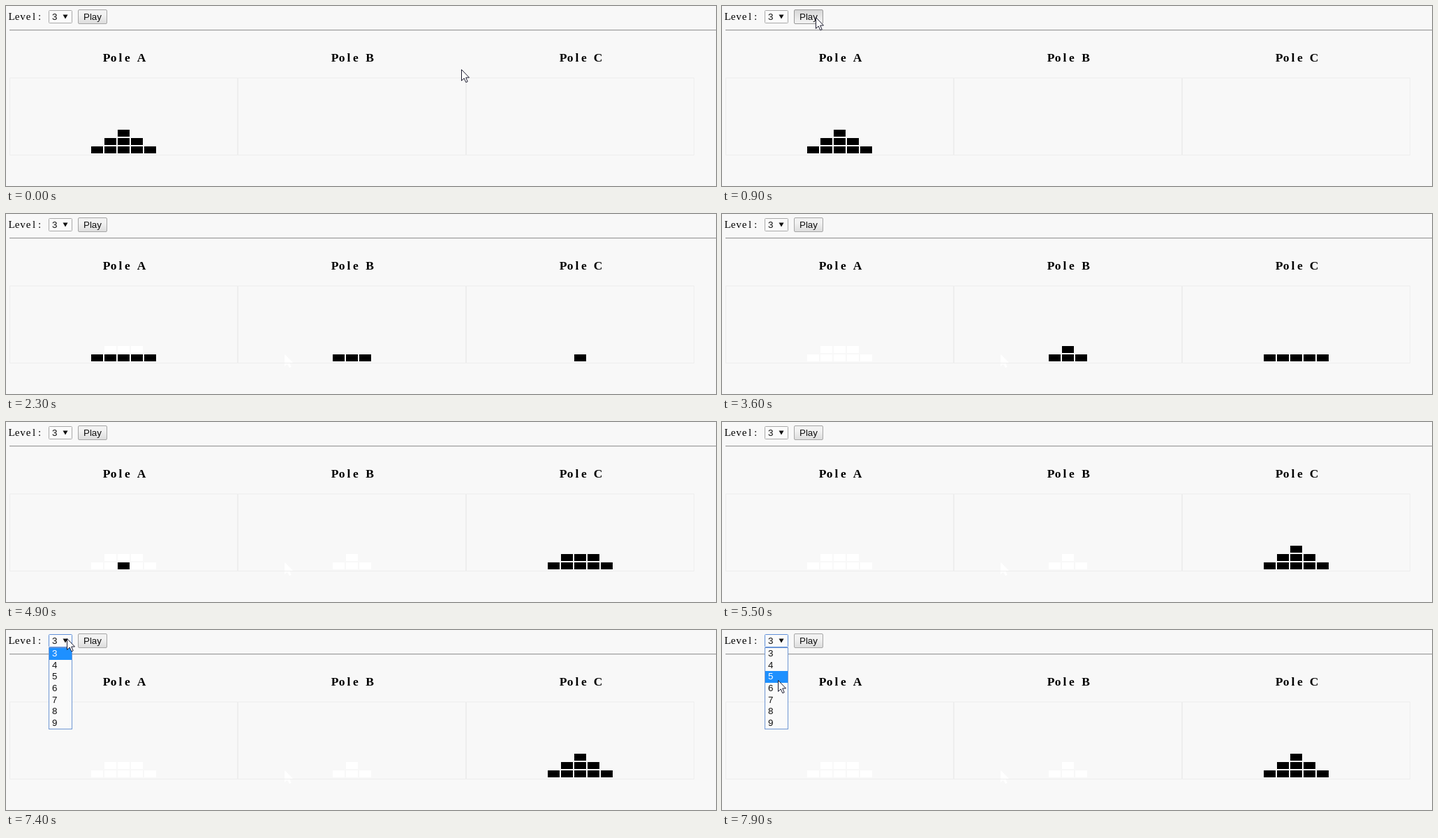
Write an HTML page that moves like this. It is 1017 px wide and 259 px high and loops after 8 s.

```html
<!DOCTYPE html>
<html lang="en">
<head>
<meta charset="utf-8">
<title>Tower puzzle</title>
<style>
  html, body { margin: 0; width: 100%; height: 100%; overflow: hidden; background: #f8f8f8; }
  svg { display: block; width: 1017px; height: 259px; }
  .serif { font-family: "Liberation Serif", Times, serif; text-anchor: middle; }
  .ui { font: 13.33px "Liberation Sans", Arial, sans-serif; fill: #111; }
  .crisp { shape-rendering: crispEdges; }
</style>
</head>
<body>
<svg viewBox="0 0 1017 259">
  <defs>
    <linearGradient id="up" x2="0" y2="1">
      <stop offset=".35" stop-color="#f2f2f2"/><stop offset="1" stop-color="#dcdcdc"/>
    </linearGradient>
    <linearGradient id="over" x2="0" y2="1">
      <stop offset=".35" stop-color="#f6f6f6"/><stop offset="1" stop-color="#e2e2e2"/>
    </linearGradient>
    <linearGradient id="down" x2="0" y2="1">
      <stop offset="0" stop-color="#d6d6d6"/><stop offset=".8" stop-color="#f0f0f0"/>
    </linearGradient>
    <path id="arrow" d="M.5 .5V16.5L4.2 13 6.8 18.8 9.2 17.8 6.7 12H11.5Z"/>
  </defs>

  <g id="labels" class="serif"></g>
  <g class="crisp">
    <path d="M5 34.5H1017" stroke="#9a9a9a"/>
    <path d="M5 35.5H1017" stroke="#e6e6e6"/>
  </g>

  <rect id="select" x="61.5" y="6.5" width="33" height="18" rx="1" fill="#fbfbfb"/>
  <text class="ui" x="66" y="20">3</text>
  <path d="M81.5 12.5H88.5L85 18.5Z" fill="#111"/>

  <rect id="button" x="103.5" y="5.5" width="41" height="20" rx="1.5"/>
  <text class="ui" x="111" y="20">Play</text>

  <path id="ghosts" class="crisp" fill="#fff"/>
  <use id="trace" href="#arrow" x="399" y="202" fill="#fff" stroke="#fff"/>
  <g id="cells" class="crisp" fill="none" stroke="#eee"></g>
  <path id="bricks" class="crisp" fill="#000"/>

  <g id="menu">
    <rect x="61.5" y="25.5" width="33" height="117" fill="#fafafa" stroke="#6f97d4"/>
    <rect id="bar" class="crisp" x="62" width="32" height="17" fill="#1e90ff"/>
  </g>
  <use id="cursor" href="#arrow" fill="#fff" stroke="#1c1c30"/>
</svg>

<script>
const LOOP = 8000, STEP = 100, PITCH = 327;
const $ = id => document.getElementById(id);

function add(parent, tag, attrs, text = "") {
  const el = document.createElementNS("http://www.w3.org/2000/svg", tag);
  for (const key in attrs) el.setAttribute(key, attrs[key]);
  el.textContent = text;
  return parent.appendChild(el);
}

// Fixed-pitch lettering: each glyph is centred in its own cell.
function cellText(text, x, y, pitch, size, weight) {
  const xs = [...text].map((c, i) => x + (i + .5) * pitch).join(" ");
  add($("labels"), "text", { x: xs, y, "font-size": size, "font-weight": weight }, text);
}

cellText("Level:", 4, 20, 8, 15, 400);
["A", "B", "C"].forEach((name, i) => {
  cellText("Pole " + name, 139 + i * PITCH, 80, 10, 17.5, 700);
  add($("cells"), "rect", { x: 5.5 + i * PITCH, y: 103.5, width: 326, height: 111 });
});

const rowTop = i => Math.round(26 + i * 16.67);
const options = [3, 4, 5, 6, 7, 8, 9].map((n, i) =>
  add($("menu"), "text", { class: "ui", x: 66, y: rowTop(i) + 12 }, n));

// lift time, drop time, from pole, to pole
const moves = [
  [1300, 1600, 0, 2], [2000, 2300, 0, 1], [2600, 3000, 2, 1], [3300, 3600, 0, 2],
  [3900, 4200, 1, 0], [4600, 4900, 1, 2], [5200, 5500, 0, 2]
];

// A disk is a row of separate bricks.
function disk(pole, row, count) {
  let d = "";
  for (let i = 0; i < count; i++) {
    const x = 160 + pole * PITCH + (i - (count - 1) / 2) * 19;
    d += `M${x} ${202 - row * 12}h17v10h-17z`;
  }
  return d;
}

function drawDisks(t) {
  const poles = [[5, 3, 1], [], []];
  let ghosts = "";
  for (const [lift, drop, from, to] of moves) {
    if (t < lift) break;
    const count = poles[from].pop();
    if (lift >= 2000) ghosts += disk(from, poles[from].length, count);
    if (t >= drop) poles[to].push(count);
  }
  $("ghosts").setAttribute("d", ghosts);
  $("bricks").setAttribute("d",
    poles.map((stack, p) => stack.map((n, row) => disk(p, row, n)).join("")).join(""));
}

// Pointer runs: [start, end, points]; points are spread evenly over the run.
const runs = [
  [0, 800, [[652, 91], [134, 16]], u => u * u * (3 - 2 * u)],
  [800, 1300, [[134, 16], [134, 16]]],
  [1300, 1900, [[134, 16], [399, 202]], u => u * u],
  [3300, 3300, [[980, 244]]],
  [6600, 7400, [[952, 137], [560, 104], [230, 70], [60, 50], [52, 40],
                [61, 28], [74, 18], [84, 13], [87, 12]]],
  [7500, 7900, [[86, 46], [83, 62], [80, 76], [80, 76], [80, 72]]]
];

function pointer(t) {
  const run = runs.find(([a, b]) => t >= a && t <= b);
  if (!run) return null;
  const [a, b, pts, ease = u => u] = run;
  const f = b > a ? ease((t - a) / (b - a)) * (pts.length - 1) : 0;
  const i = Math.floor(f), p = pts[i], q = pts[i + 1] || p;
  return p.map((v, k) => Math.round(v + (q[k] - v) * (f - i)));
}

function drawControls(t, pos) {
  const over = pos && pos[0] >= 103 && pos[0] < 145 && pos[1] >= 5 && pos[1] < 26;
  const state = over ? (t === 900 ? "down" : "over") : "up";
  $("button").setAttribute("fill", `url(#${state})`);
  $("button").setAttribute("stroke", over ? "#989898" : "#a6a6a6");

  const open = t >= 7400;
  $("select").setAttribute("stroke", open ? "#5f8fd8" : "#a9a9a9");
  $("menu").style.display = open ? "" : "none";
  if (!open) return;
  const pick = Math.max(0, Math.floor((pos[1] - 26) / 16.67));
  $("bar").setAttribute("y", rowTop(pick));
  options.forEach((el, i) => el.style.fill = i === pick ? "#fff" : "#111");
}

function draw(t) {
  const pos = pointer(t);
  $("cursor").style.display = pos ? "" : "none";
  if (pos) $("cursor").setAttribute("transform", `translate(${pos})`);
  $("trace").style.display = t >= 2000 ? "" : "none";
  drawDisks(t);
  drawControls(t, pos);
}

const start = performance.now();
function tick() {
  const t = (performance.now() - start) % LOOP;
  draw(Math.floor(t / STEP) * STEP);
  requestAnimationFrame(tick);
}
tick();
</script>
</body>
</html>
```
